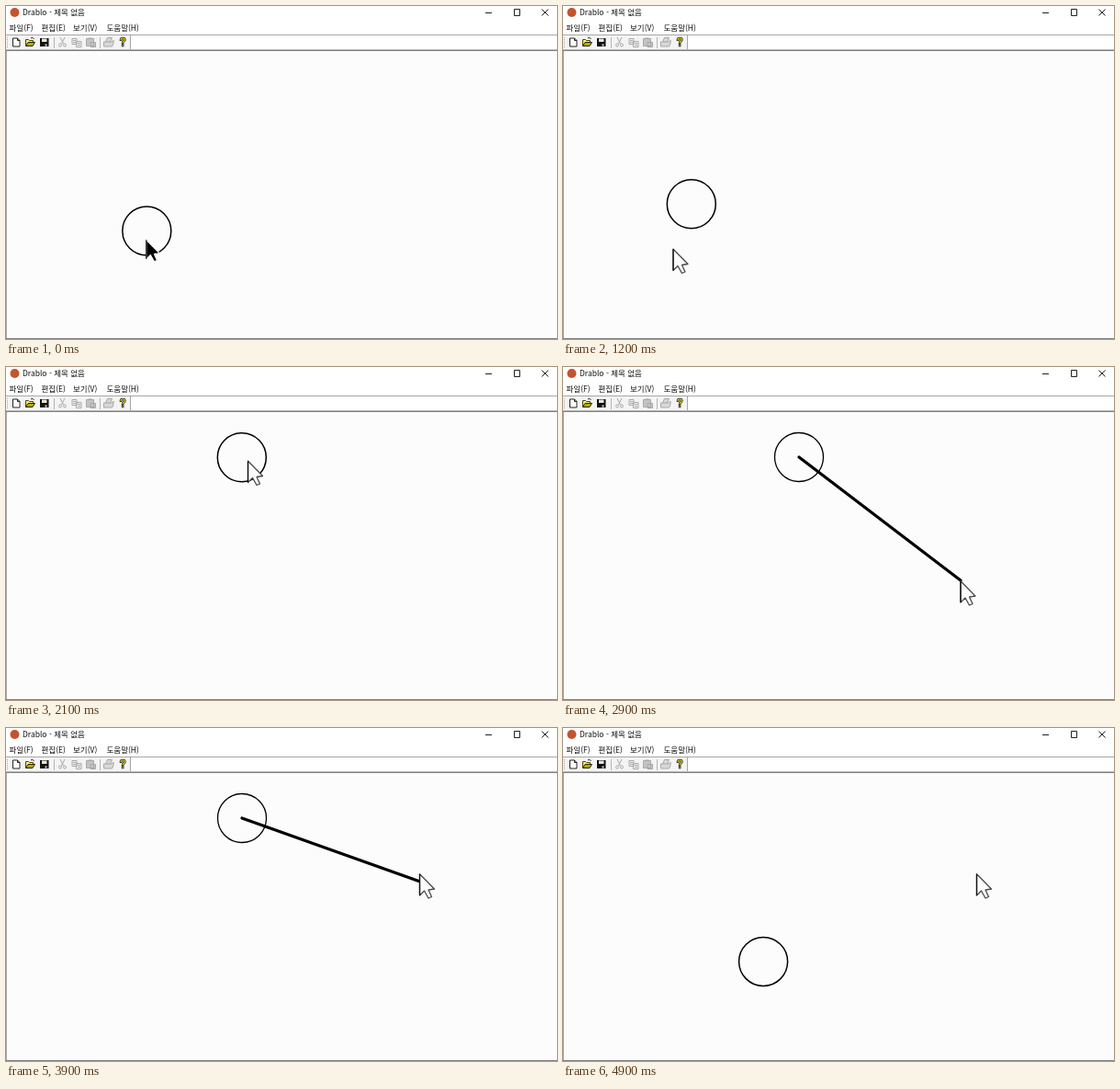
An HTML page for the animation above (5 s loop, 600 px wide and 362 px high).

```html
<!DOCTYPE html>
<html lang="ko">
<head>
<meta charset="utf-8">
<title>Drablo</title>
<style>
  html, body { margin: 0; width: 100%; height: 100%; overflow: hidden; background: #fff; }
  svg { display: block; width: 600px; height: 362px; }
  text { font: 8.5px "Noto Sans CJK KR", "Noto Sans CJK", "Noto Sans", sans-serif; fill: #111; }
  .stroke { fill: none; stroke: #222; }
  .off { fill: none; stroke: #a8a8a8; }
  .crisp { shape-rendering: crispEdges; }
  .body { fill: #fdfcfd; stroke: #4a4a4a; stroke-width: 1.3; stroke-linejoin: round; }
  .edge { stroke: #111; stroke-width: 1.3; }
  .dark .body { fill: #000; stroke: #f4f4f4; }
  .dark .edge { stroke: #000; }
</style>
</head>
<body>
<svg viewBox="0 0 600 362">
  <defs>
    <clipPath id="view"><rect x="1" y="49" width="599" height="312"/></clipPath>
  </defs>
  <rect width="600" height="362" fill="#fff"/>

  <!-- title bar -->
  <circle cx="9.5" cy="7" r="5" fill="#c4532f"/>
  <text x="18" y="10.3">Drablo - 제목 없음</text>
  <path class="stroke" d="M522 7.5h7M553.5 3.5h6v7h-6zM583.5 3.5l7 7M590.5 3.5l-7 7"/>

  <!-- menu -->
  <text x="3.5" y="27">파일(F)</text>
  <text x="38.5" y="27">편집(E)</text>
  <text x="73" y="27">보기(V)</text>
  <text x="109.5" y="27">도움말(H)</text>

  <!-- toolbar -->
  <rect y="32" width="135" height="15" fill="#f4f4f4"/>
  <g class="crisp" fill="none">
    <path d="M0 31.5h600M135.5 32v15" stroke="#a6a6a6"/>
    <path d="M52.5 34v12M102.5 34v12" stroke="#b4b4b4"/>
    <path d="M1.5 34v12" stroke="#aaa" stroke-dasharray="1 1"/>
  </g>
  <path d="M7.5 35h5l2.5 2.5v6.5h-7.5zM12.5 35v2.5h2.5" fill="#fff" stroke="#222"/>
  <path d="M21.5 43.5v-7h3l1 1h4v2" fill="#f7ee7c" stroke="#4a4600"/>
  <path d="M21.5 43.5l2.5-4h7.5l-2.5 4z" fill="#b8a800" stroke="#222"/>
  <path d="M27 35q2-2 3.5 1" class="stroke"/>
  <rect x="37" y="35" width="9.5" height="9" fill="#111"/>
  <path d="M39 35.5h5.5v3.5H39z" fill="#e8e8d8"/>
  <path d="M42.5 41.5h2v2h-2z" fill="#ddd"/>
  <g class="off">
    <path d="M59 34l3.5 7M64 34l-3.5 7"/>
    <circle cx="59" cy="42.5" r="1.5"/><circle cx="64" cy="42.5" r="1.5"/>
    <path d="M72 35.5h5v6h-5zM76.5 38.5h5.5v6h-5.5zM73 37.5h3M73 39.5h3M78 40.5h3M78 42.5h3"/>
    <path d="M87.5 35.5h8v8h-8zM92 39.5h5.5v5H92z" fill="#c4c4c4"/>
    <path d="M89.5 35h4"/>
    <path d="M108.5 39l2-4.5h5l-2 4.5M106.5 39h9l1.5-2v4l-1.500 3h-9z" fill="#d8d8d8"/>
  </g>
  <g fill="none" stroke-linecap="square">
    <path id="ask" d="M125 36.700q0-1.700 2.200-1.700t2.200 1.700q0 1-1.200 1.700t-1.100 1.600M127.100 42.700v.2"/>
    <use href="#ask" stroke="#222" stroke-width="2.600"/>
    <use href="#ask" stroke="#efe000" stroke-width="1.100"/>
  </g>

  <!-- drawing area -->
  <rect y="48" width="600" height="314" fill="#fdfcfd"/>
  <g class="crisp" fill="none">
    <path d="M0 47.5h600" stroke="#b4b4b4"/>
    <path d="M0 48.5h600M0 361.5h600" stroke="#828282"/>
    <path d="M.5 49v312" stroke="#a6a6a6"/>
  </g>
  <g clip-path="url(#view)">
    <circle id="ball" r="26.5" fill="none" stroke="#000" stroke-width="1.5"/>
    <line id="band" stroke="#000" stroke-width="3.3" stroke-linecap="round"/>
  </g>
  <g id="arrow">
    <path class="body" d="M0 .8V24L5 19L9.5 27L13 25.5L9.5 18L16 17Z"/>
    <path class="edge" d="M0 .8V24"/>
  </g>
</svg>
<script>
const LOOP = 5000, STEP = 100;
const ball = document.getElementById('ball');
const band = document.getElementById('band');
const arrow = document.getElementById('arrow');

// time, x, y of the pointer
const path = [
  [0, 152.8, 253.5], [200, 135, 226], [500, 54, 263.5], [700, 54, 263.5],
  [1100, 120, 263.5], [1300, 120, 263.5], [1800, 364, 196], [2100, 263.5, 101.5],
  [2300, 263.5, 101.5], [2800, 433, 232], [3300, 433, 232],
  [3800, 451, 167], [3900, 450.5, 158], [LOOP, 450.5, 158]
];

function pointer(t) {
  const i = Math.max(1, path.findIndex(p => p[0] >= t));
  const [t0, x0, y0] = path[i - 1], [t1, x1, y1] = path[i];
  const u = Math.max(0, (t - t0) / (t1 - t0));
  return [x0 + (x1 - x0) * u, y0 + (y1 - y0) * u];
}

// reflect v between two walls
function bounce(v, lo, hi) {
  const span = hi - lo;
  const m = (((v - lo) % (2 * span)) + 2 * span) % (2 * span);
  return lo + (m > span ? 2 * span - m : m);
}

function ballAt(t) {
  if (t < 1140) {
    const d = Math.min(21.3, 0.13 * t);
    return [153.3 - d, 244.5 - d];
  }
  if (t <= 4200) {
    const d = Math.min(125, 0.13 * (t - 1140));
    return [132 + d, 223 - d];
  }
  const d = 0.603 * (t - 4200);
  return [bounce(257 - d, 26.5, 573), bounce(98 - d, 46, 335)];
}

const dragging = t => (t >= 300 && t < 1140) || (t >= 2400 && t <= 4200);

function set(el, attrs) {
  for (const k in attrs) el.setAttribute(k, attrs[k]);
}

function draw(now) {
  const t = Math.floor((now % LOOP) / STEP) * STEP;
  const [cx, cy] = ballAt(t);
  const [px, py] = pointer(t);
  const [x2, y2] = pointer(t - STEP);  // the band trails the pointer by one step
  const drag = dragging(t);
  const dark = t < STEP;
  set(ball, { cx, cy, 'stroke-width': drag ? 1.3 : 1.5 });
  set(band, { x1: cx, y1: cy, x2, y2, visibility: drag ? 'visible' : 'hidden' });
  set(arrow, {
    transform: `translate(${px} ${py}) scale(${dark ? 0.9 : 1})`,
    class: dark ? 'dark' : ''
  });
}

const start = performance.now();
function tick() {
  draw(performance.now() - start);
  requestAnimationFrame(tick);
}
tick();
</script>
</body>
</html>
```
